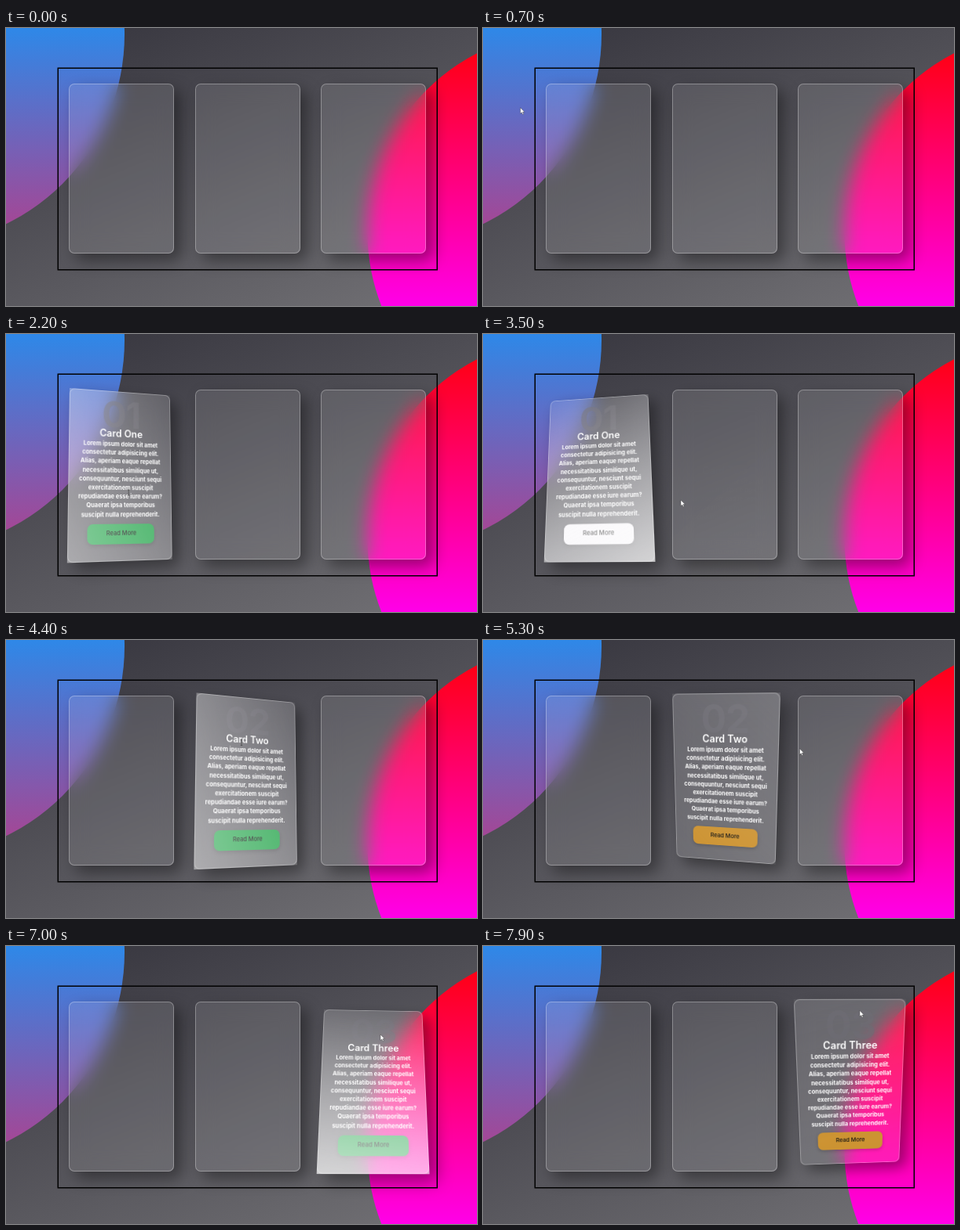
An HTML page for the animation above (8 s loop, 600 by 355 pixels).

```html
<!DOCTYPE html>
<html lang="en">
<head>
<meta charset="utf-8">
<title>Glass tilt cards</title>
<style>
  html, body { margin: 0; width: 100%; height: 100%; overflow: hidden; }
  body { background: #55535a; }
  #stage {
    position: relative; width: 600px; height: 355px; overflow: hidden;
    background: linear-gradient(158deg, #34333c, #737276);
    font-family: Poppins, Inter, sans-serif;
  }
  .disc, .frame { position: absolute; left: 0; top: 0; width: 600px; height: 355px; }
  .blue { background: linear-gradient(#2e88e8, #d42c74); clip-path: circle(270px at -119px 8px); }
  .pink { background: linear-gradient(#f00, #ff00e8); clip-path: circle(257.5px at 718px 261px); }
  .card {
    position: absolute; top: 71px; width: 134px; height: 217px; box-sizing: border-box;
    border: 1px solid rgba(255, 255, 255, .3); border-radius: 7px;
    background: rgba(255, 255, 255, .1);
    box-shadow: 9px 9px 20px rgba(0, 0, 0, .4);
    backdrop-filter: blur(12px);
    transform: perspective(450px) rotateX(var(--rx)) rotateY(var(--ry));
  }
  .content {
    position: absolute; inset: -1px; color: #fff; text-align: center; white-space: nowrap;
    opacity: var(--on); transform: translateY(calc(48px - 48px * var(--on)));
  }
  .content > * { position: absolute; left: 0; right: 0; margin: 0; }
  h2 { top: 2px; font: 700 48px/58px Poppins, Inter, sans-serif; letter-spacing: -1px; color: rgba(104, 102, 110, .6); }
  h3 { top: 46px; font: 600 12.5px/19px Poppins, Inter, sans-serif; }
  p { top: 64px; font-size: 7.4px; font-weight: 700; line-height: 11.2px; }
  .content > .btn {
    top: 171px; left: 24px; right: 24px; height: 24.5px; border-radius: 7px;
    font-size: 7.5px; font-weight: 500; line-height: 24.5px; color: #111;
    background: var(--btn); box-shadow: 0 2px 5px rgba(0, 0, 0, .2);
  }
  .glare { position: absolute; inset: -1px; overflow: hidden; opacity: var(--glare); }
  .glare i {
    position: absolute; left: -67px; top: -25.5px; width: 268px; height: 268px;
    background: linear-gradient(0deg, rgba(255, 255, 255, 0), #fff);
    transform: rotate(var(--ang));
  }
  #cursor { position: absolute; left: 0; top: 0; width: 8px; height: 10px; overflow: visible; }
</style>
</head>
<body>
<div id="stage">
  <div class="disc blue"></div>
  <div class="disc pink"></div>
  <svg class="frame"><rect x="66.25" y="51.25" width="483" height="257.5" fill="none" stroke="#000" stroke-width="1.5"/></svg>
  <svg id="cursor">
    <path id="arrow" d="M0 0V7.6L1.8 6 3 8.8 4.2 8.3 3 5.6H5.3Z" fill="#fff" stroke="#333" stroke-width=".4"/>
    <path id="beam" d="M-1.2 -3.5H1.2M0 -3.5V3.5M-1.2 3.5H1.2" fill="none" stroke="#444" stroke-width=".7"/>
  </svg>
</div>
<script>
  const LOOP = 8000, FADE = 500;
  const stage = document.getElementById('stage');
  const cursor = document.getElementById('cursor');
  const arrow = document.getElementById('arrow');
  const beam = document.getElementById('beam');

  const text = ['Lorem ipsum dolor sit amet', 'consectetur adipisicing elit.',
    'Alias, aperiam eaque repellat', 'necessitatibus similique ut,',
    'consequuntur, nesciunt sequi', 'exercitationem suscipit',
    'repudiandae esse iure earum?', 'Quaerat ipsa temporibus',
    'suscipit nulla reprehenderit.'].join('<br>');

  // Hover interval in ms, and the direction of the lean when it begins, in degrees
  const cards = [
    { name: 'One', from: 800, to: 3480, turn: -37 },
    { name: 'Two', from: 3480, to: 5980, turn: 45 },
    { name: 'Three', from: 5980, to: 9000, turn: -35 }
  ];

  // Pointer stops: time, x, y
  const stops = [[0, -15, 5], [1400, 110, 198], [3500, 252, 212],
    [4400, 300, 131], [6000, 474, 144], [8000, 480, 82]];

  const clamp = v => Math.min(1, Math.max(0, v));
  const smooth = v => (v = clamp(v), v * v * (3 - 2 * v));

  // The lean circles the card, slowly gathering speed
  function lean(card, s) {
    const angle = (card.turn + 105 * s + 24 * s * s) * Math.PI / 180;
    const size = 16.5 + 2.8 * Math.cos(3.5 * (s - .6));
    return [size * Math.cos(angle), size * Math.sin(angle)];
  }

  // Gold, then green, then gold again while hovered; white otherwise
  function buttonColor(card, t) {
    if (t < card.from || t > card.to) return '#f6f4f8';
    const s = (t - card.from) / 1000 % 2;
    const g = clamp((.56 - Math.abs(s - 1.16)) / .3);
    const gold = [204, 146, 48], green = [40, 166, 78];
    return `rgb(${gold.map((c, i) => c + (green[i] - c) * g)})`;
  }

  cards.forEach((card, i) => {
    const el = card.el = document.createElement('div');
    card.x = 80 + 160.5 * i;
    el.className = 'card';
    el.style.left = card.x + 'px';
    el.innerHTML = `<div class="content"><h2>0${i + 1}</h2><h3>Card ${card.name}</h3>
      <p>${text}</p><div class="btn">Read More</div></div><div class="glare"><i></i></div>`;
    stage.insertBefore(el, cursor);
  });

  function drawCard(card, t) {
    const on = smooth((t - card.from) / FADE) * (1 - smooth((t - card.to) / FADE));
    const [x, y] = lean(card, (t - card.from) / 1000);
    const vars = {
      rx: y * on + 'deg', ry: -x * on + 'deg', on,
      glare: clamp(.5 + y / 36) * .78 * on,
      ang: Math.atan2(x, -y) + 'rad',
      btn: buttonColor(card, t)
    };
    for (const key in vars) card.el.style.setProperty('--' + key, vars[key]);
  }

  function drawCursor(t) {
    const i = stops.findIndex(stop => stop[0] > t);
    const [t0, x0, y0] = stops[i - 1], [t1, x1, y1] = stops[i];
    const k = smooth((t - t0) / (t1 - t0));
    const x = x0 + (x1 - x0) * k, y = y0 + (y1 - y0) * k;
    const overText = y > 115 && y < 240 && cards.some(c =>
      t > c.from + 300 && t < c.to && Math.abs(x - c.x - 67) < 55);
    cursor.style.transform = `translate(${x}px, ${y}px)`;
    arrow.style.display = overText ? 'none' : '';
    beam.style.display = overText ? '' : 'none';
  }

  const start = performance.now();
  function frame() {
    const t = (performance.now() - start) % LOOP;
    cards.forEach(card => drawCard(card, t));
    drawCursor(t);
    requestAnimationFrame(frame);
  }
  frame();
</script>
</body>
</html>
```
